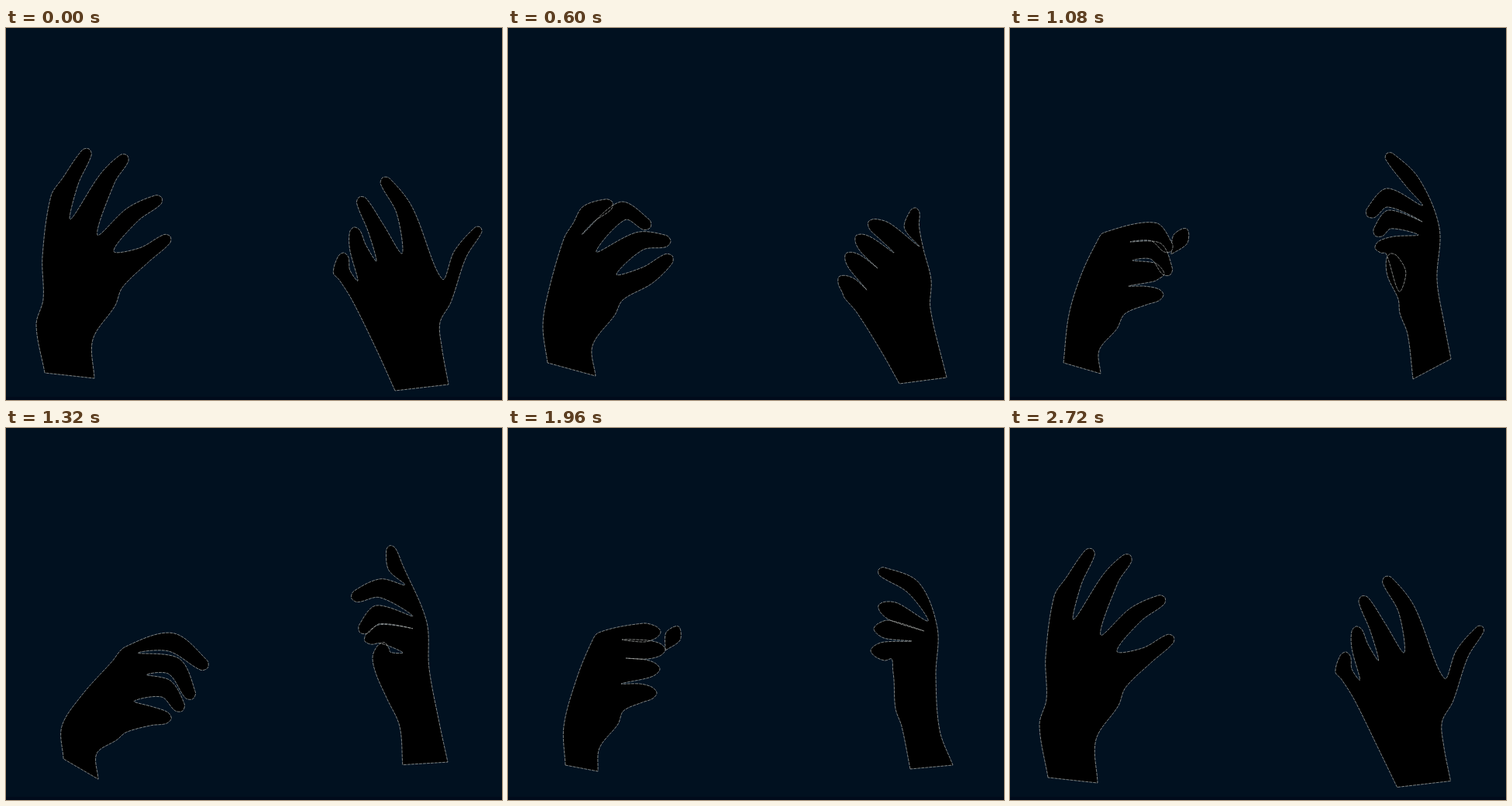
Recreate the animation shown at these times as an HTML page. Size 640 px wide and 480 px high, loop 2.88 s.

```html
<!DOCTYPE html>
<html lang="en">
<head>
<meta charset="utf-8">
<title>Hands</title>
<style>
  html, body { margin: 0; width: 100%; height: 100%; overflow: hidden; background: #011120; }
  svg { display: block; width: 100%; height: 100%; }
  path { fill: #000; stroke: #b4b6b4; stroke-width: .7; stroke-dasharray: 4 1; }
</style>
</head>
<body>
<svg viewBox="0 0 640 480">
  <rect width="640" height="480" fill="#011120"/>
  <rect y="476" width="640" height="4" fill="#010b1b"/>
  <path id="stub"/>
  <path id="left"/>
  <path id="right"/>
</svg>
<script>
const LOOP = 2880;
const MIRROR = 3040; // the motion runs forward, then back, around half this time
const STEPS = [0, 160, 320, 400, 480, 560, 600, 720, 800, 880, 960, 1000,
               1080, 1160, 1240, 1280, 1320, 1400, 1480];
const FINGERS = { left: 4, right: 5 };
const OUTER = 3; // points from the last finger back to the wrist

const points = text => text.trim().split(/\s+/).map(p => p.split(',').map(Number));
const pose = (width, left, right, stub) =>
  ({ width, left: points(left), right: points(right), stub: points(stub) });

const lerp = (a, b, k) => a + (b - a) * k;
const mixPoints = (a, b, k) => a.map((p, i) => p.map((v, j) => lerp(v, b[i][j], k)));
const mix = (a, b, k) => ({
  width: lerp(a.width, b.width, k),
  left: mixPoints(a.left, b.left, k),
  right: mixPoints(a.right, b.right, k),
  stub: mixPoints(a.stub, b.stub, k)
});

// A hand runs clockwise: the arm, then knuckle, tip and valley of each finger, then the arm.
const open = pose(9,
  `50,445 39,383 48,350 47,295 58,217
   83,198 107,156 83,247  131,194 156,164 118,267
   163,241 201,219 139,288  178,293 212,269 150,335
   141,358 112,402 114,452`,
  `502,468 478,415 447,352 430,325
   433,314 436,290 454,326  454,283 449,257 478,301  477,258 456,218 511,291
   514,235 486,193 563,324  586,292 612,257 574,354
   560,380 562,410 571,460`,
  `165,242 165,242`);

const pinch = pose(10,
  `51,432 45,385 51,345 72,272 84,252
   104,240 135,225 96,266  148,236 184,257 114,289
   170,275 210,275 140,318  180,319 212,294 148,351
   138,370 109,410 113,449`,
  `505,459 482,418 450,367 434,348
   440,333 427,321 463,338  450,304 436,291 477,310  464,281 449,268 498,290
   486,262 465,250 531,282  521,257 526,232 536,285
   546,325 545,362 566,451`,
  `185,275 185,275`);

const fist = pose(10,
  `74,435 72,385 88,325 107,278 117,264
   175,264 197,263 147,273  180,286 203,286 152,297
   178,311 196,311 146,330  172,342 192,342 149,365
   142,382 118,413 116,443`,
  `519,440 508,385 500,362 498,325
   496.5,311.5 496.5,311.5 495,298  486,288 468,287 521,275  490,260 472,259 537,262
   498,237 478,229 542,249  523,206 478,183 554,258
   552,320 557,390 574,435`,
  `203,287 220,256`);

const clasp = pose(10,
  `69,432 76,370 92,318 112,276 121,264
   185,263 208,288 155,276  188,288 206,319 158,300
   186,315 199,318 153,333  175,345 198,344 148,369
   138,388 115,416 117,446`,
  `520,453 513,395 503,368 501,350
   499,318 491,291 502,340  490,280 471,284 527,267  490,247 471,268 532,250
   487,219 461,243 532,229  520,200 486,162 554,258
   551,325 560,380 569,427`,
  `208,292 228,259`);

const point = pose(10,
  `74,427 72,385 97,345 136,301 153,282
   212,276 259,309 170,290  216,307 240,349 181,318
   206,336 227,364 165,352  188,371 213,374 155,392
   143,402 117,420 119,453`,
  `512,435 508,385 492,350 478,318
   485,293 488,277 512,291  483,266 463,275 525,259  480,241 457,264 525,243
   483,207 446,220 515,203  503,180 495,152 543,250
   546,310 559,380 570,431`,
  `200,282 200,282`);

const shift = (hand, dx, dy, wristDy) => hand.map(([x, y], i) =>
  [x + dx, y + (i % (hand.length - 1) ? dy : wristDy)]);
const relaxed = {
  ...open,
  left: shift(open.left, -1, 0, 6),
  right: shift(open.right, -2.5, -1, -4.5)
};

const KEYS = [
  [0, open], [160, relaxed], [240, relaxed], [600, pinch], [800, mix(pinch, fist, .85)],
  [1000, fist], [1080, clasp], [1280, point], [1480, mix(clasp, point, 1.12)]
];

function poseAt(time) {
  const next = KEYS.findIndex(([at]) => at > time);
  if (next < 0) return KEYS[KEYS.length - 1][1];
  const [t0, a] = KEYS[next - 1], [t1, b] = KEYS[next];
  return mix(a, b, (time - t0) / (t1 - t0));
}

const dist = (p, q) => Math.hypot(p[0] - q[0], p[1] - q[1]);
const direction = (p, q) => {
  const length = dist(p, q) || 1;
  return [(q[0] - p[0]) / length, (q[1] - p[1]) / length];
};
const beside = (p, [dx, dy], along, across) =>
  [p[0] + dx * along + dy * across, p[1] + dy * along - dx * across];

// Outline of a tapered finger, from its left side over the tip to its right side.
function finger(base, knuckle, tip, width) {
  const w = Math.min(width, dist(base, tip) / 2);
  const whole = direction(base, tip), end = direction(knuckle, tip);
  return [
    beside(knuckle, whole, 0, 1.2 * w),
    beside(tip, end, -.6 * w, .75 * w),
    tip,
    beside(tip, end, -.6 * w, -.75 * w),
    beside(knuckle, whole, 0, -1.2 * w)
  ];
}

function handOutline(hand, count, width) {
  const first = hand.length - OUTER - 3 * count;
  const outline = hand.slice(0, first);
  for (let f = 0; f < count; f++) {
    const i = first + 3 * f;
    const [before, knuckle, tip, valley] = hand.slice(i - 1, i + 3);
    const base = [lerp(before[0], valley[0], .5), lerp(before[1], valley[1], .5)];
    const isThumb = f === 4;
    outline.push(...finger(base, knuckle, tip, isThumb ? .8 * width : width), valley);
  }
  return outline.concat(hand.slice(-OUTER));
}

// Smooth curve whose handles scale with the distance between points.
function curve(list) {
  const at = i => list[Math.max(0, Math.min(list.length - 1, i))];
  const handle = (i, side) => {
    const p = at(i), before = at(i - 1), after = at(i + 1);
    const span = dist(p, before) + dist(p, after) || 1;
    const k = side * dist(p, at(i + side)) / span / 3;
    return [p[0] + (after[0] - before[0]) * k, p[1] + (after[1] - before[1]) * k];
  };
  const format = p => p.map(v => v.toFixed(2)).join(' ');
  let d = 'M' + format(list[0]);
  for (let i = 0; i < list.length - 1; i++)
    d += 'C' + [handle(i, 1), handle(i + 1, -1), at(i + 1)].map(format).join(' ');
  return d + 'Z';
}

const setShape = (id, outline) => document.getElementById(id).setAttribute('d', curve(outline));
let shown = -1;

function draw(time) {
  const t = time % LOOP;
  const folded = t < MIRROR / 2 ? t : MIRROR - t - .001;
  const step = STEPS.filter(start => start <= folded).pop();
  if (step === shown) return;
  shown = step;
  const now = poseAt(step);
  for (const side in FINGERS) setShape(side, handOutline(now[side], FINGERS[side], now.width));
  const [base, tip] = now.stub;
  const middle = [lerp(base[0], tip[0], .55), lerp(base[1], tip[1], .55)];
  setShape('stub', [base, ...finger(base, middle, tip, .85 * now.width), base]);
}

function tick() {
  draw(performance.now());
  requestAnimationFrame(tick);
}
tick();
</script>
</body>
</html>
```
